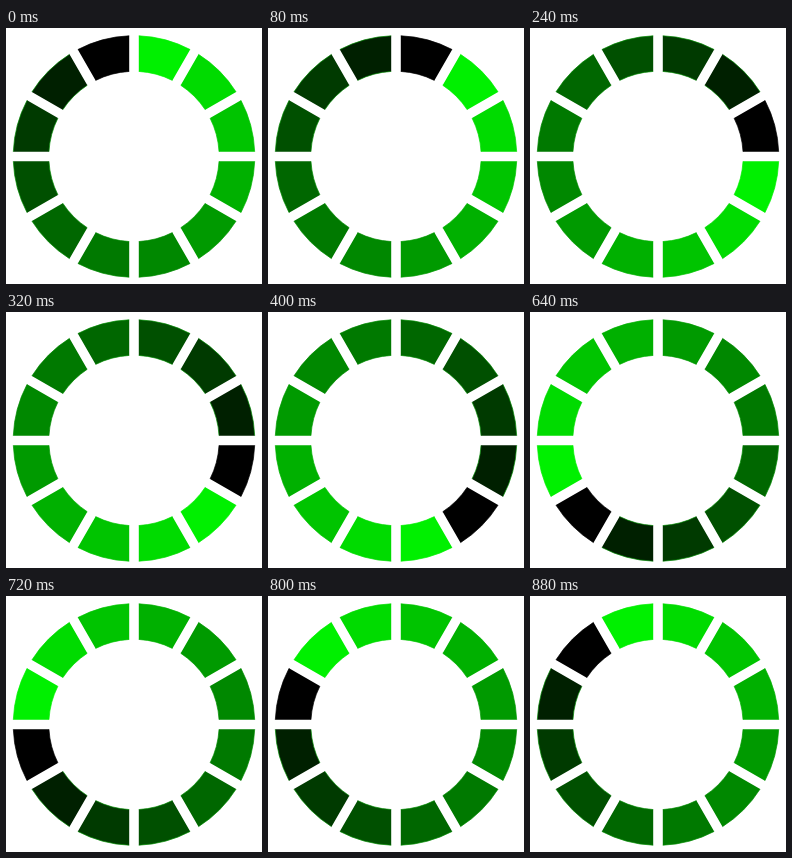
These frames come from a looping animation (256x256 px, 0.96 s). An HTML page:

```html
<!DOCTYPE html>
<html lang="en">
<head>
<meta charset="utf-8">
<title>Loading ring</title>
<style>
html, body { margin: 0; width: 100%; height: 100%; overflow: hidden; background: #fff; }
svg { display: block; width: 100vw; height: 100vh; }
</style>
</head>
<body>
<svg id="stage" viewBox="0 0 256 256"></svg>
<script>
const COUNT = 12, STEP = 80;
const CX = 128, CY = 128.5, OUTER = 120.8, INNER = 85.2, HALF_GAP = 4.8;
// green level of each block, clockwise from the brightest
const LEVELS = [240, 219, 196, 176, 154, 136, 121, 103, 80, 58, 32, 0];
const RIM = 140;
const stage = document.getElementById('stage');

function point(radius, angle) {
  const x = CX + radius * Math.sin(angle), y = CY - radius * Math.cos(angle);
  return x.toFixed(2) + ' ' + y.toFixed(2);
}

// ends of an arc whose sides run parallel to the gaps
function ends(radius, index) {
  const inset = Math.asin(HALF_GAP / radius), turn = 2 * Math.PI / COUNT;
  return [point(radius, index * turn + inset), point(radius, (index + 1) * turn - inset)];
}

function addPath(d, attrs) {
  const path = document.createElementNS('http://www.w3.org/2000/svg', 'path');
  path.setAttribute('d', d);
  for (const key in attrs) path.setAttribute(key, attrs[key]);
  return stage.appendChild(path);
}

const blocks = Array.from({ length: COUNT }, (_, i) => {
  const [a, b] = ends(OUTER, i), [c, d] = ends(INNER, i);
  const outerArc = `A${OUTER} ${OUTER} 0 0 1 ${b}`;
  const innerArc = `A${INNER} ${INNER} 0 0 0 ${c}`;
  return {
    body: addPath(`M${a}${outerArc}L${d}${innerArc}Z`, {}),
    rim: addPath(`M${a}${outerArc}M${d}${innerArc}`, { fill: 'none', 'stroke-width': 0.7 })
  };
});

function render(time) {
  const step = Math.floor(time / STEP) % COUNT;
  blocks.forEach(({ body, rim }, i) => {
    const level = LEVELS[(i - step + COUNT) % COUNT];
    body.setAttribute('fill', `rgb(0,${level},0)`);
    rim.setAttribute('stroke', `rgb(0,${level && Math.max(level, RIM)},0)`);
  });
}

const start = performance.now();
function tick() {
  render(performance.now() - start);
  requestAnimationFrame(tick);
}
tick();
</script>
</body>
</html>
```
